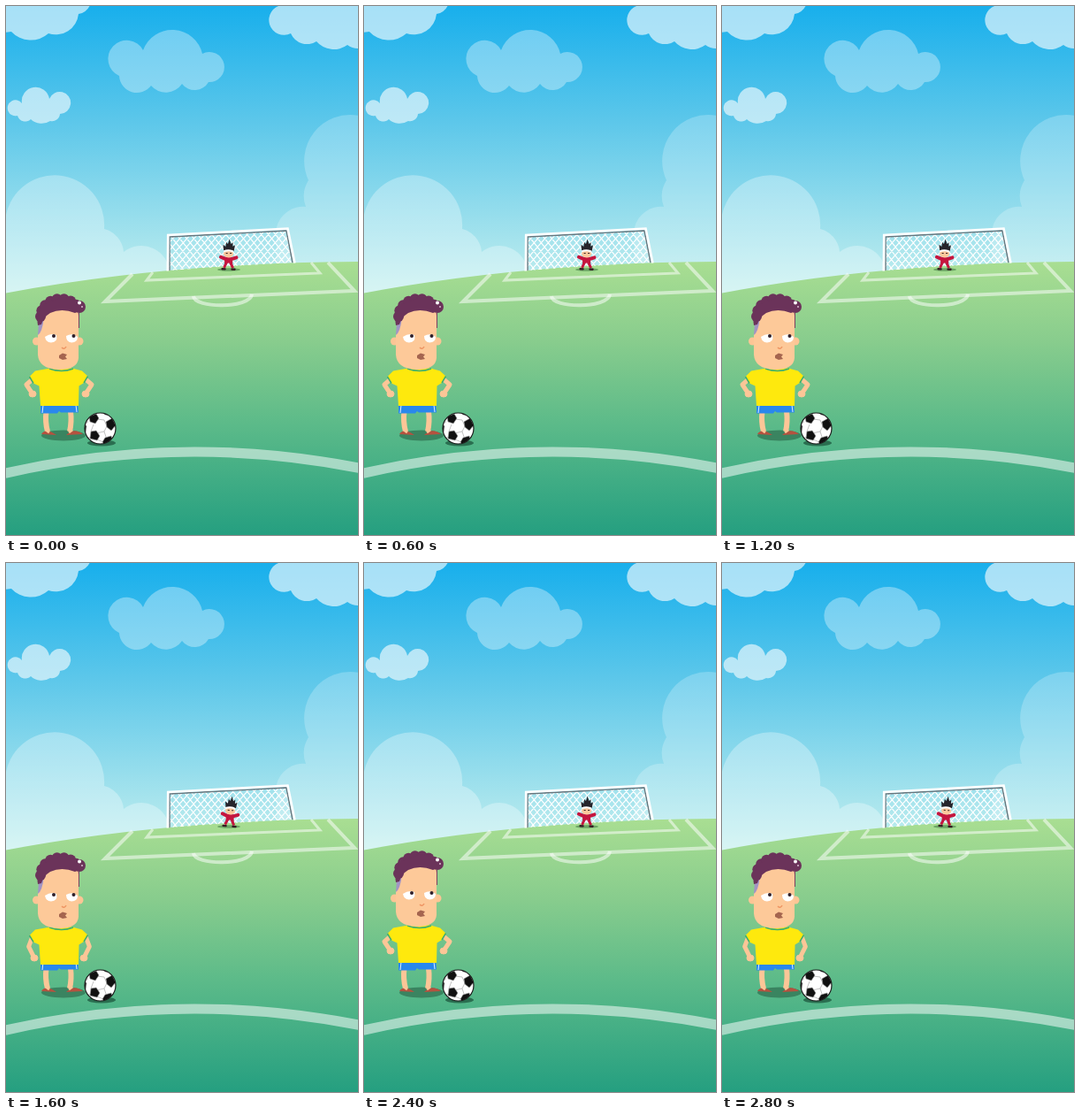
Recreate the animation shown at these times as an HTML page. Size 398 by 598 pixels, loop 3 s.

```html
<!DOCTYPE html>
<html lang="en">
<head>
<meta charset="utf-8">
<title>Penalty kick</title>
<style>
  html, body { margin: 0; width: 100%; height: 100%; overflow: hidden; }
  svg { display: block; width: 398px; height: 598px; }
</style>
</head>
<body>
<svg viewBox="0 0 398 598">
  <defs>
    <linearGradient id="sky" gradientUnits="userSpaceOnUse" x1="0" y1="0" x2="0" y2="325">
      <stop offset="0" stop-color="#18afec"/>
      <stop offset=".4" stop-color="#5cc7ea"/>
      <stop offset="1" stop-color="#c6f0ee"/>
    </linearGradient>
    <linearGradient id="grass" gradientUnits="userSpaceOnUse" x1="0" y1="289" x2="0" y2="598">
      <stop offset="0" stop-color="#a9de92"/>
      <stop offset=".3" stop-color="#87cc8d"/>
      <stop offset=".6" stop-color="#5bba89"/>
      <stop offset="1" stop-color="#259f80"/>
    </linearGradient>
    <clipPath id="netArea"><path d="M185 261L317 254L324 290L255 294L184 299Z"/></clipPath>
    <clipPath id="ballArea"><circle cx="106.500" cy="477.500" r="17.500"/></clipPath>
  </defs>

  <rect width="398" height="330" fill="url(#sky)"/>
  <g fill="#fff">
    <path opacity=".3" d="M-1 243A56 56 0 0 1 111 252A29 29 0 0 1 133 278A32 32 0 0 1 185 302V330H-1Z"/>
    <path opacity=".22" d="M399 124A52 52 0 0 0 342 197A34 34 0 0 0 339 227A31 31 0 0 0 306 250V310H399Z"/>
    <path opacity=".62" d="M-1 -1H95A17 17 0 0 1 82 9A26 26 0 0 1 48 31A30 30 0 0 1 6 29L-1 30Z"/>
    <path opacity=".34" d="M128 79A21 21 0 1 1 155 50A35 35 0 0 1 222 54A17 17 0 1 1 229 86A18 18 0 0 1 199 88A22 22 0 0 1 164 90A20 20 0 0 1 128 79Z"/>
    <path opacity=".6" d="M13 124A9 9 0 1 1 18 110A15.700 15.700 0 0 1 49 105A12.500 12.500 0 1 1 61 122A9 9 0 0 1 50 130A18 18 0 0 1 28 128A9 9 0 0 1 13 124Z"/>
    <path opacity=".62" d="M399 -1V48A20 20 0 0 1 386 44A26 26 0 0 1 351 40A20 20 0 0 1 322 31A17 17 0 1 1 312 -1Z"/>
  </g>

  <path d="M0 324.500Q185 290 398 289V598H0Z" fill="url(#grass)"/>
  <g fill="none" stroke="#fff" stroke-opacity=".52">
    <path d="M143 303L112 334L394 322L364 290" stroke-width="4"/>
    <path d="M166 301L159 310L355 302L345 290" stroke-width="3"/>
    <path d="M212 328C213 342 276 342 278 326" stroke-width="4"/>
    <path d="M-1 528.200Q199 483 399 522.200" stroke-width="11.200"/>
  </g>

  <!-- goal -->
  <path id="net" clip-path="url(#netArea)" fill="none" stroke="#fff" stroke-width="1.200"/>
  <path d="M185 299V261L317 254L324 290" fill="none" stroke="#68757c" stroke-width="1.400"/>
  <path d="M182.800 299.500L183.200 259L318.500 251.500L326.500 290.500" fill="none" stroke="#fff" stroke-width="2.600"/>

  <ellipse cx="252" cy="298" rx="13" ry="1.800" fill="#6ba564"/>
  <g id="keeper">
    <path d="M248.500 290L246 296M253 290L256 296" stroke="#c5163f" stroke-width="3"/>
    <path d="M244 297.500H247M255 297.500H258" stroke="#351c22" stroke-width="2.400" stroke-linecap="round"/>
    <path d="M242 284L247 286M259.500 284L254 286" stroke="#c5163f" stroke-width="4" stroke-linecap="round"/>
    <path d="M246 284H255L255.500 292L251 290.500L246.500 292Z" fill="#c5163f"/>
    <ellipse cx="250.500" cy="280" rx="5.500" ry="4.500" fill="#fbc99c"/>
    <path d="M245 277L244 270L247 272L247.500 267L249.500 269L251 263.500L253 269L255 267L255 271.500L257.500 270L256.500 277Z" fill="#25242a"/>
    <path d="M245 277.500Q250.500 275 256 277.500" fill="none" stroke="#fff" stroke-width="2"/>
    <path d="M247.500 279.500H249.500M252 279.500H254" stroke="#3a2020"/>
  </g>

  <!-- striker -->
  <ellipse cx="65" cy="485.500" rx="25" ry="6" fill="#3a8460"/>
  <path d="M45.500 458Q44 470 47 481M73 458Q74.500 470 72 481" fill="none" stroke="#fcc697" stroke-width="6"/>
  <path d="M40 484Q45 476 57 485ZM68 485Q77 476 87 484Z" fill="#b5523f"/>
  <path d="M45 479L49 482M71 482L75 479" stroke="#fcc697" stroke-width="3"/>
  <path d="M39 448H81L82 459.500H62L60 458L58 460.500H39Z" fill="#2988ed"/>
  <path d="M42 451L41 460M79 451L80 459" stroke="#d9efff"/>
  <g id="arms" fill="#fcc697" stroke="#fcc697"></g>
  <g id="torso">
    <path d="M50 409.500L33 412.500L26.500 419L31 426.500L37.500 429.500L39 452H82L82.500 429.500L88 426L92.500 418.500L86 412.500L75 409.500Z" fill="#fee90d"/>
    <path d="M26.500 419L31 426.500M92.500 418.500L88 426M49 410Q63 415 76 410" fill="none" stroke="#3eae70" stroke-width="1.500"/>
  </g>
  <g id="head">
    <circle cx="34.500" cy="379" r="4.500" fill="#fcc595"/>
    <circle cx="83" cy="379" r="4.500" fill="#fcc595"/>
    <path d="M37 358L46 352V373H36Z" fill="#a294c4"/>
    <path d="M82 347V364" stroke="#76405f" stroke-width="2"/>
    <path d="M43 352Q49 342 62 341H77Q82 342 82 350V398Q81 411 59 411Q37 410 36 394V372Q41 369 43 352Z" fill="#fdc999"/>
    <g id="hair" fill="#6b335a"></g>
    <path d="M36 361Q33 345 46 336L63 329L84 334L88 343L78 347Q63 341 50 347Q42 352 40 360Z" fill="#6b335a"/>
    <circle cx="83" cy="335.500" r="2" fill="#fff"/>
    <circle cx="86" cy="340" r="1" fill="#d9bdd1"/>
    <path d="M44 374Q51 369 57 372Q59 380 51 380.500Q45 380 44 374ZM68 373Q75 369 81 374Q81 380 74 380.500Q68 380 68 373Z" fill="#fff"/>
    <circle cx="54" cy="373" r="2" fill="#30202a"/>
    <circle cx="76.500" cy="373" r="2" fill="#30202a"/>
    <path d="M63 386Q66 389 68 385" fill="none" stroke="#ee9664" stroke-width="1.500"/>
    <path d="M60 395L64 392.500L69 394L67 396.500L69 399L64 400L60 398Z" fill="#a5654f"/>
  </g>

  <!-- ball -->
  <ellipse cx="108" cy="494" rx="16" ry="3.500" fill="#2a6e50"/>
  <circle cx="106.500" cy="477.500" r="17.500" fill="#fff"/>
  <g clip-path="url(#ballArea)" fill="#111" stroke="#999" stroke-width=".6">
    <path d="M103 467L111 468L114 475M99 473L96 481M102 483L111 481L114 475M111 481L113 487M95 487L91 490M103 490L110 493M93 470L88 472" fill="none"/>
    <path d="M94 464L102 461L105 466L101 472L95 470Z"/>
    <path d="M113 470L120 466L124 474L119 480L114 476Z"/>
    <path d="M96 481L102 480L106 486L103 491L95 489Z"/>
    <path d="M112 488L119 486L121 494L113 497L109 493Z"/>
    <path d="M88 471L91 475L90 482L85 481ZM107 458L115 459L118 463L112 462Z"/>
  </g>
  <circle cx="106.500" cy="477.500" r="17.500" fill="none" stroke="#1b1b1b" stroke-width="1.200"/>
</svg>

<script>
const byId = id => document.getElementById(id);
const TAU = 2 * Math.PI;
const STEP = 200;          // ms each pose is held
const STEPS_PER_BREATH = 3;

// curls along the upper arc of the head
let curls = '';
for (let i = 0; i <= 7; i++) {
  const angle = TAU * (.5 + .055 * i);
  curls += `<circle cx="${62 + 23 * Math.cos(angle)}" cy="${351 + 20 * Math.sin(angle)}" r="6"/>`;
}
byId('hair').innerHTML = curls + '<circle cx="83" cy="340" r="7"/>';

let mesh = '';
for (let x = 130; x < 370; x += 8) mesh += `M${x} 250l42 52M${x} 302l46 -52`;
byId('net').setAttribute('d', mesh);

function arm(mirrored, drop) {
  const at = x => mirrored ? 120 - x : x;
  const hand = { x: at(30 + drop / 4), y: 438.5 + drop };
  const elbow = { x: at(23 + drop / 3), y: 428 + drop * .7 };
  return `<path d="M${at(30)} 422L${elbow.x} ${elbow.y}L${hand.x} ${hand.y}"
      fill="none" stroke-width="5" stroke-linejoin="round"/>
    <ellipse cx="${hand.x}" cy="${hand.y}" rx="4" ry="3.500"/>`;
}

function draw(time) {
  const phase = Math.floor(time / STEP) % STEPS_PER_BREATH;
  const sunk = phase === STEPS_PER_BREATH - 1 ? 1 : 0;
  for (const part of ['head', 'torso'])
    byId(part).setAttribute('transform', `translate(0 ${2 * sunk})`);
  byId('arms').innerHTML = arm(false, 8 * sunk) + arm(true, 8 * sunk);

  const lean = 1.4 - 3 * Math.sin(TAU * phase / STEPS_PER_BREATH);
  byId('keeper').setAttribute('transform', `translate(${lean * .4}) rotate(${lean * 1.3} 251 297)`);
}

const start = performance.now();
function frame() {
  draw(performance.now() - start);
  requestAnimationFrame(frame);
}
frame();
</script>
</body>
</html>
```
